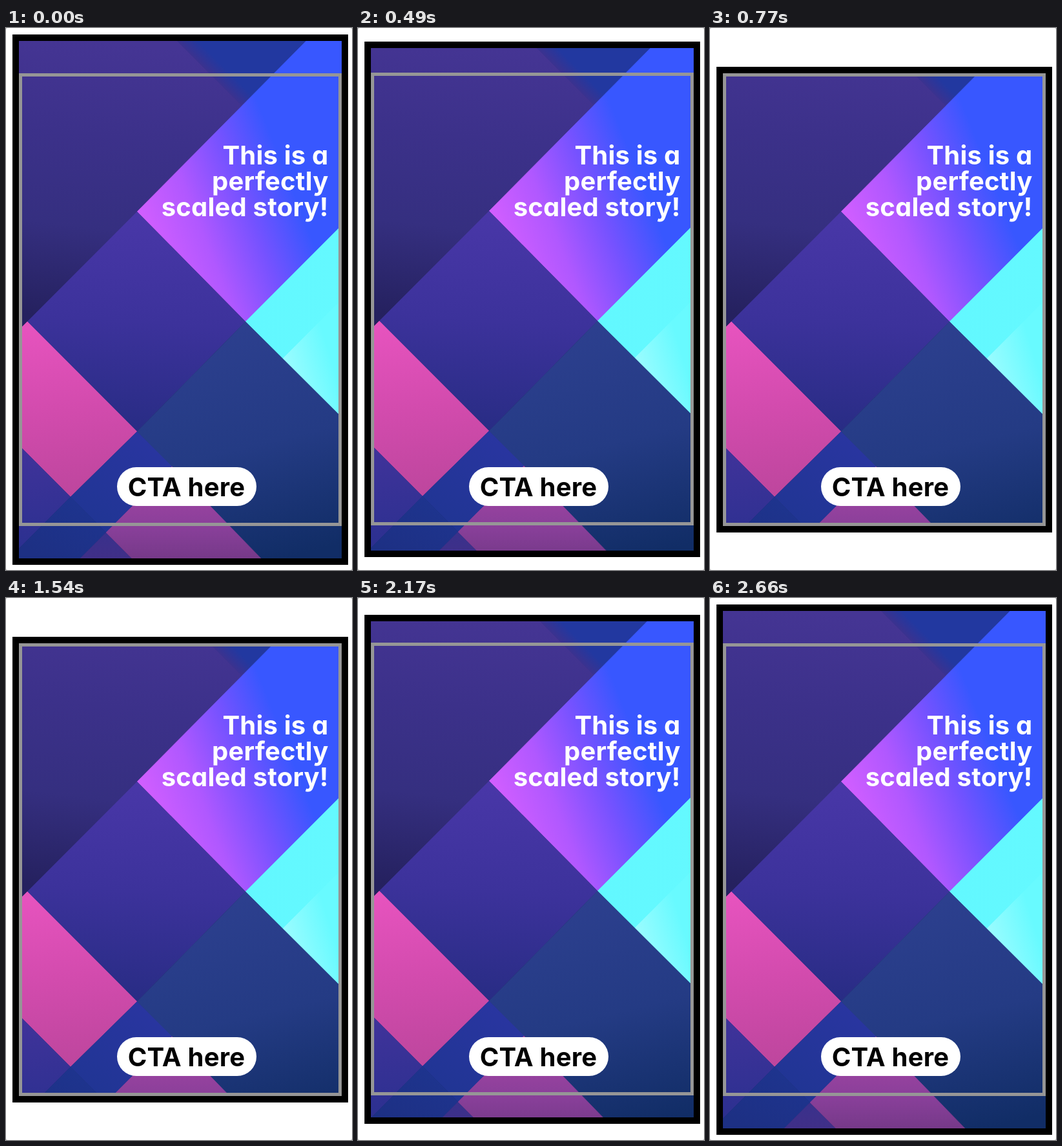
Recreate the animation shown at these times as an HTML page. Size 536 px wide and 838 px high, loop 2730 ms.

```html
<!DOCTYPE html>
<html lang="en">
<head>
<meta charset="utf-8">
<title>Scaled story</title>
<style>
  html, body { margin: 0; height: 100%; overflow: hidden; background: #c8c8c8; }
  svg { display: block; width: 536px; height: 838px; }
  text { font: 700 40px Inter, "Open Sans", sans-serif; font-feature-settings: "cv11"; letter-spacing: .2px; }
</style>
</head>
<body>
<svg viewBox="0 0 536 838">
  <defs>
    <clipPath id="window"><rect id="opening" x="20" width="500"/></clipPath>
    <g id="gradients"></g>
  </defs>
  <rect width="536" height="838" rx="3" fill="#fff"/>
  <rect id="frame" x="10" width="520"/>
  <g clip-path="url(#window)"><g id="art"></g></g>
  <rect id="safeArea" x="22.5" y="72.5" width="495" height="695" fill="none" stroke="#969696" stroke-width="5"/>
  <g fill="#fff" text-anchor="end">
    <text x="499.5" y="211">This is a</text>
    <text x="499.5" y="251">perfectly</text>
    <text x="499.5" y="291">scaled story!</text>
  </g>
  <rect x="172" y="679" width="216" height="60" rx="30" fill="#fff"/>
  <text x="279.5" y="723.5" text-anchor="middle">CTA here</text>
</svg>
<script>
const byId = id => document.getElementById(id);

// Each facet: outline, gradient axis (x1 y1 x2 y2), evenly spaced colours.
const facets = [
  ['20,20 465,20 203,284 20,467', [150, 20, 100, 450], ['#453594', '#3c318a', '#352f80', '#25215f']],
  ['265,20 465,20 366,121', [316, 71, 332, 55], ['#3b328f', '#2238a0']],
  ['465,20 520,20 520,305 371,454 203,284', [215, 300, 430, 215], ['#d05eff', '#b058ff', '#7652ff', '#3857ff']],
  ['520,305 520,602 371,454', [371, 454, 520, 454], ['#62f8ff', '#64f9ff']],
  ['429,511 520,420 520,602', [435, 520, 500, 500], ['#98fcff', '#68faff']],
  ['203,284 371,454 203,624 33,454', [215, 284, 190, 624], ['#4937a8', '#3c329b', '#282c84']],
  ['371,454 520,602 520,820 395,820 203,624', [345, 470, 430, 820], ['#2c3f8e', '#243b84', '#112d66']],
  ['33,454 203,624 100,725 20,645 20,467', [70, 460, 100, 725], ['#e653be', '#d24bad', '#bd469d']],
  ['20,645 100,725 20,805', [30, 650, 40, 800], ['#40339a', '#2c3090']],
  ['203,624 257,678 155,780 100,725', [210, 630, 130, 770], ['#2935a0', '#203593']],
  ['100,725 155,780 115,820 20,820 20,805', [110, 730, 60, 820], ['#1e348e', '#1d3084']],
  ['155,780 195,820 115,820', [155, 780, 155, 820], ['#39318c', '#402f88']],
  ['257,678 395,820 195,820 155,780', [270, 735, 270, 820], ['#97429f', '#873f98', '#763989']],
];

facets.forEach(([points, [x1, y1, x2, y2], colours], i) => {
  const stops = colours.map((colour, k) =>
    `<stop offset="${k / (colours.length - 1)}" stop-color="${colour}"/>`).join('');
  byId('gradients').innerHTML += `<linearGradient id="g${i}" gradientUnits="userSpaceOnUse"
    x1="${x1}" y1="${y1}" x2="${x2}" y2="${y2}">${stops}</linearGradient>`;
  byId('art').innerHTML +=
    `<polygon points="${points}" fill="url(#g${i})" stroke="url(#g${i})" stroke-width=".6"/>`;
});

const LOOP = 2730, STEP = 70, MOVE = 310, TRAVEL = 50;

function ease(time, start) {
  const x = Math.min(1, Math.max(0, (time - start) / MOVE));
  return x * x * (3 - 2 * x);
}

function place(rect, top, bottom) {
  rect.setAttribute('y', top);
  rect.setAttribute('height', bottom - top);
}

function draw(now) {
  const time = Math.floor((now % LOOP) / STEP) * STEP;
  const inset = TRAVEL * (ease(time, 395) - ease(time, 1981));
  // Both edges snap down to whole pixels, so the centred art can sit a pixel higher.
  const top = Math.floor(10 + inset), bottom = Math.floor(830 - inset);
  const shift = Math.floor((top + bottom) / 2) - 420;
  place(byId('frame'), top, bottom);
  place(byId('opening'), top + 10, bottom - 10);
  for (const id of ['art', 'safeArea']) byId(id).setAttribute('transform', `translate(0 ${shift})`);
  requestAnimationFrame(draw);
}
requestAnimationFrame(draw);
</script>
</body>
</html>
```
